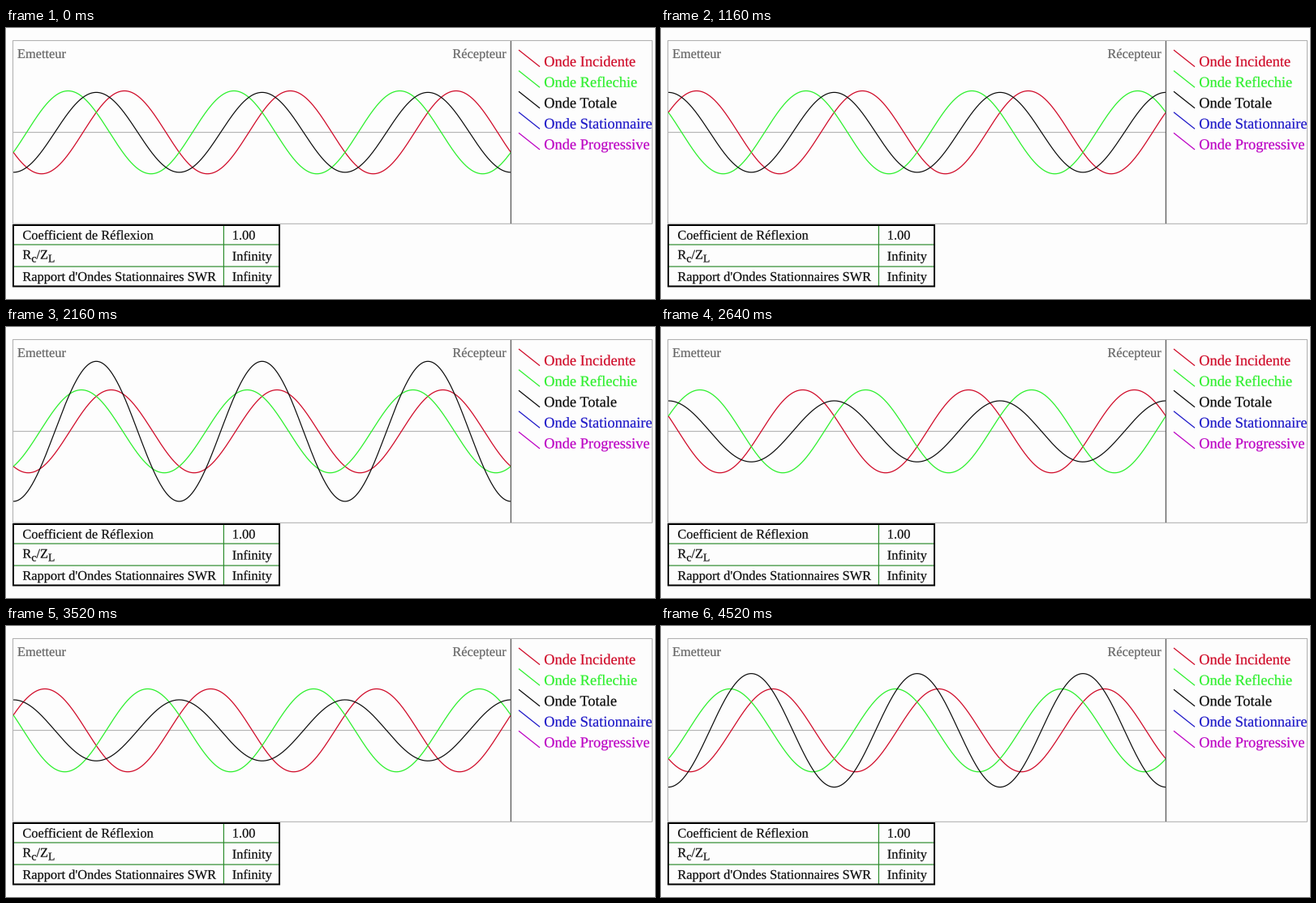
These frames come from a looping animation (800x334 px, 4560 ms). A matplotlib script:

```python
import numpy as np
import matplotlib.pyplot as plt
from matplotlib.animation import FuncAnimation
from matplotlib.patches import PathPatch, Rectangle
from matplotlib.textpath import TextPath
from matplotlib.transforms import Affine2D

W, H, DPI = 800, 334, 100
FRAMES, INTERVAL = 114, 40
TICK_MS = 46                 # the simulation advances slower than the frames
STEP = 2 * np.pi / 50
START = 67 * np.pi / 50

LEFT, RIGHT, MID, AMP = 9.1, 622.3, 128.6, 51.1
RED, GREEN, BLACK = "#d00a28", "#2cf02c", "#0a0a0a"
BLUE, MAGENTA = "#1c16c8", "#bc00c4"
GRAY, LABEL, TABLE_GREEN = "#b2b2b2", "#646464", "#2c8c2c"

plt.rcParams["font.family"] = "Liberation Serif"


def pt(px):
    return px * 72 / DPI


fig = plt.figure(figsize=(W / DPI, H / DPI), dpi=DPI, facecolor="#fdfdfd")
ax = fig.add_axes([0, 0, 1, 1])
ax.set_xlim(0, W)
ax.set_ylim(H, 0)
ax.axis("off")


def line(xs, ys, color, width=1.1, z=2):
    return ax.plot(xs, ys, color=color, lw=pt(width), zorder=z, snap=False,
                   solid_capstyle="butt")[0]


def label(x, y, text, size=16.35, color=BLACK):
    """Text outlines with a subpixel baseline at (x, y)."""
    place = Affine2D().scale(1, -1).translate(x, y)
    outline = TextPath((0, 0), text, size=size).transformed(place)
    ax.add_patch(PathPatch(outline, fc=color, ec=color, lw=pt(0.2),
                           snap=False, zorder=3))


def box(x0, y0, x1, y1, color, width):
    ax.add_patch(Rectangle((x0, y0), x1 - x0, y1 - y0, fill=False, ec=color,
                           lw=pt(width), joinstyle="miter", snap=False,
                           zorder=4))


# plot panel
box(8.5, 15.5, 796.5, 241.3, GRAY, 1.1)
line([LEFT, RIGHT], [MID, MID], GRAY)
line([622.4, 622.4], [16, 241], "#5c5c5c", 1.3, z=6)
label(14, 37, "Emetteur", color=LABEL)
label(550.4, 37, "Récepteur", color=LABEL)

# legend
legend = [("Incidente", RED), ("Reflechie", GREEN), ("Totale", BLACK),
          ("Stationnaire", BLUE), ("Progressive", MAGENTA)]
for i, (name, color) in enumerate(legend):
    y = 47.2 + 25.55 * i
    line([632, 658], [y - 20.1, y + 0.5], color, 1.25)
    label(663.2, y, "Onde " + name, 18.4, color)

# table
box(9, 243, 337, 318.4, "#000000", 2)
for y in (267, 294):
    line([10, 336], [y, y], TABLE_GREEN, 1.2)
line([268.4, 268.4], [244, 318], TABLE_GREEN, 1.2)
label(20.4, 260.6, "Coefficient de Réflexion")
label(278.8, 260.6, "1.00")
for x, y, text, size in ((20.4, 284.6, "R", 16.35), (31.4, 288.5, "c", 13.6),
                         (37.4, 284.6, "/", 16.35), (42, 284.6, "Z", 16.35),
                         (52, 288.5, "L", 13.6)):
    label(x, y, text, size)
label(278.8, 286.5, "Infinity")
label(20.4, 311.7, "Rapport d'Ondes Stationnaires SWR")
label(278.8, 311.7, "Infinity")

# waves
x = np.linspace(LEFT, RIGHT, 614)
kx = 6 * np.pi * (x - LEFT) / (RIGHT - LEFT)
incident = line(x, x * 0 + MID, RED, 1.25, 5)
reflected = line(x, x * 0 + MID, GREEN, 1.25, 5.1)
total = line(x, x * 0 + MID, BLACK, 1.2, 5.2)


def update(frame):
    phase = START + STEP * (frame * INTERVAL // TICK_MS)
    forward, backward = np.cos(kx - phase), np.cos(kx + phase)
    for curve, wave in ((incident, forward), (reflected, backward),
                        (total, forward + backward)):
        curve.set_ydata(MID - AMP * wave)
    return incident, reflected, total


anim = FuncAnimation(fig, update, frames=FRAMES, interval=INTERVAL,
                     repeat=True, repeat_delay=0, blit=False)
plt.show()
```
